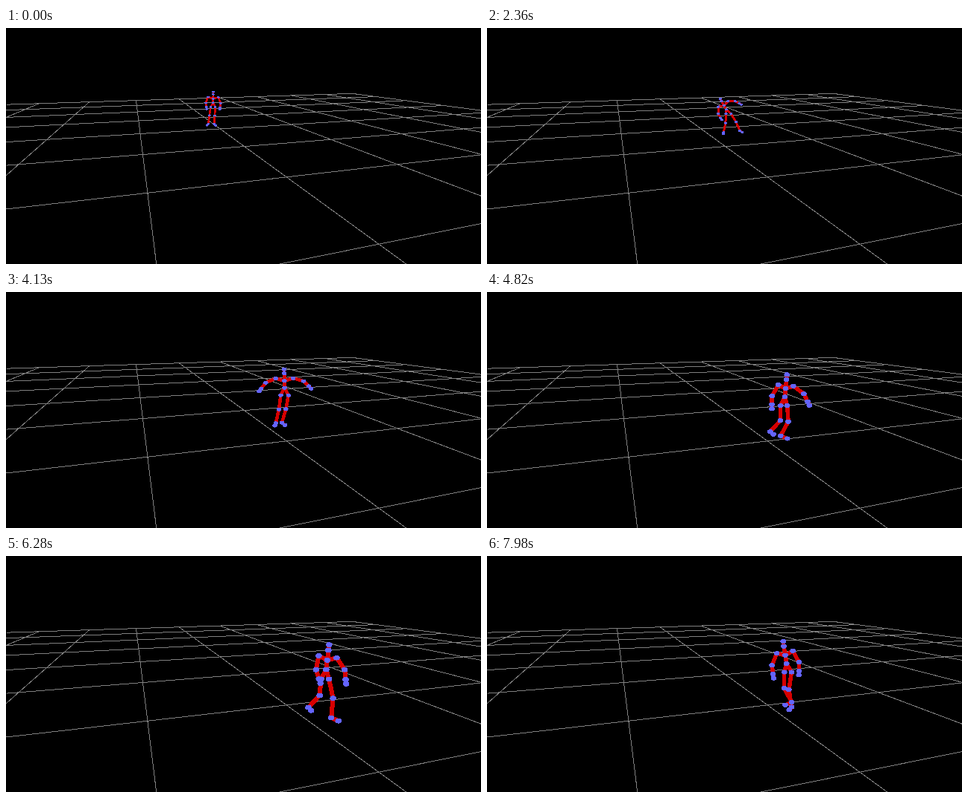
Recreate the animation shown at these times as an HTML page. Size 637x318 px, loop 8 s.

```html
<!DOCTYPE html>
<html lang="en">
<head>
<meta charset="utf-8">
<title>Walking figure</title>
<style>
  html, body { margin: 0; width: 100%; height: 100%; overflow: hidden; background: #000; }
  svg { display: block; width: 637px; height: 318px; }
  path { fill: none; }
</style>
</head>
<body>
<svg viewBox="0 0 637 318" shape-rendering="crispEdges">
  <path id="grid" stroke="#808080" transform="translate(.5 .5)"/>
  <path id="bones" stroke="#d60000" stroke-linejoin="round"/>
  <g id="dots" fill="#6464ff"></g>
</svg>
<script>
const LOOP = 8000, STEP = 76.85, LEAD = 24;
const { sin, cos, hypot, sqrt, max, min, PI } = Math;
const el = id => document.getElementById(id);
const rad = deg => deg * PI / 180;
const mix = (a, b, u) => a + (b - a) * u;
const between = (p, q, u) => [mix(p[0], q[0], u), mix(p[1], q[1], u)];
const line = points => 'M' + points.map(p => p.map(v => v.toFixed(2)).join(' ')).join('L');

// Floor grid: two families of lines, each meeting at its own vanishing point
function drawGrid() {
  const right = [1700, 48.3], back = [168, 48.8];
  const farEdge = x => 103 - 0.0323 * x;
  const edge = (farEdge(465) - back[1]) / (465 - back[0]);
  let d = '';
  for (let k = 0; k < 8; k++) {
    const y = right[1] + 1 / (0.002913 + 0.00221 * k);
    const slope = (y - right[1]) / right[0];
    const x = min(640, (y - back[1] + edge * back[0]) / (slope + edge));
    d += line([[0, y], [x, y - slope * x]]);
  }
  for (const x of [43, 111, 174, 232, 287, 336, 383, 428, 465]) {
    const from = [x, farEdge(x)];
    d += line([from, between(back, from, 7)]);
  }
  el('grid').setAttribute('d', d);
}

// Limb angles are degrees from straight down, positive to the right.
const names = ['at', 'hipX', 'hipY', 'headX', 'headY', 'turn', 'armL', 'armR', 'legL', 'legR'];
const key = (...values) => Object.fromEntries(names.map((name, i) => [name, values[i]]));
const keys = [
  key(0, 277.5, 106.5, 278, 86, 0, -6, 7, -8, -3),
  key(1520, 299.5, 118, 301, 96, 30, -21, 45, -19, 10),
  key(3130, 348, 115.5, 328, 95, 0, 36, 95, 5, 32),
  key(4130, 373.5, 139, 373, 104, 10, -52, 60, -10, -13),
  key(5590, 421.5, 164.5, 427, 118, 72, 31, 23, -32, -1),
  key(6900, 425.5, 163.5, 429, 119, 0, -27, 20, -8, 2),
  key(7980, 403.5, 156.5, 397, 115, -40, -7, 14, 14, 0)
];

// Smooth curve through the keys, with an alternating step of the legs in between
function poseAt(time) {
  let i = 0;
  while (i < keys.length - 2 && time >= keys[i + 1].at) i++;
  const a = keys[i], b = keys[i + 1];
  const before = keys[max(0, i - 1)], after = keys[min(keys.length - 1, i + 2)];
  const span = b.at - a.at, u = min(1, (time - a.at) / span), v = 1 - u;
  const pose = {};
  for (const name of names) {
    const speedA = (b[name] - a[name === name ? name : 0] + a[name] - before[name]) / (b.at - before.at);
    const speedB = (after[name] - a[name]) / (after.at - a.at);
    pose[name] = a[name] * v * v * (1 + 2 * u) + b[name] * u * u * (1 + 2 * v)
      + span * u * v * (v * speedA - u * speedB);
  }
  const swing = 10 * sin(2 * PI * u);
  pose.legL += swing;
  pose.legR -= swing;
  return pose;
}

const polar = ([x, y], angle, reach) => [x + reach * sin(angle), y + reach * cos(angle)];

// Middle joint of a limb: the closer its ends, the further it bulges sideways
function bend(a, b, length, bulge) {
  const dx = b[0] - a[0], dy = b[1] - a[1], d = hypot(dx, dy);
  const out = bulge * sqrt(max(0, length * length - d * d)) / 2 / d;
  return [(a[0] + b[0]) / 2 + dy * out, (a[1] + b[1]) / 2 - dx * out];
}

function drawFigure(time) {
  const pose = poseAt(time);
  const head = [pose.headX, pose.headY], hips = [pose.hipX, pose.hipY];
  const up = [head[0] - hips[0], head[1] - hips[1]], size = hypot(...up);
  const side = sin(rad(pose.turn)), front = cos(rad(pose.turn));
  const [belly, chest, shoulders, neck] = [0.28, 0.55, 0.65, 0.84].map(u => between(hips, head, u));

  const arm = (sign, deg) => {
    const wide = sign * 0.34 * front;
    const shoulder = [shoulders[0] - up[1] * wide, shoulders[1] + up[0] * wide];
    const hand = polar(shoulder, rad(deg), 0.8 * size);
    const elbow = bend(shoulder, hand, 0.95 * size, sign * 0.4);
    return [shoulder, elbow, between(elbow, hand, 0.68), hand];
  };
  // A trailing leg lifts its foot; knees bend the way the body is turned
  const leg = (sign, deg) => {
    const hip = [hips[0] + sign * 0.15 * size * front, hips[1]];
    const trail = max(0, -sin(rad(deg)) * side);
    const ankle = polar(hip, rad(deg), size * (1.12 - 0.85 * trail));
    const knee = bend(hip, ankle, 1.2 * size, 0.6 * side);
    const toe = [ankle[0] + size * (0.22 * side + sign * 0.08 * front), ankle[1] + 0.09 * size];
    return [hip, knee, ankle, toe];
  };
  const arms = [arm(-1, pose.armL), arm(1, pose.armR)];
  const legs = [leg(-1, pose.legL), leg(1, pose.legR)];

  const bones = [[head, neck, chest, belly], ...arms.map(a => [chest, ...a]), ...legs.map(l => [belly, ...l])];
  el('bones').setAttribute('d', bones.map(line).join(''));
  el('bones').setAttribute('stroke-width', (0.13 * size).toFixed(2));

  const rx = (0.092 * size).toFixed(2), ry = (0.073 * size).toFixed(2);
  el('dots').innerHTML = [head, neck, chest, belly, ...arms.flat(), ...legs.flat()].map(([x, y]) =>
    `<ellipse cx="${x.toFixed(2)}" cy="${y.toFixed(2)}" rx="${rx}" ry="${ry}"/>`).join('');
}

let shown = -1;
function tick() {
  const time = performance.now() % LOOP;
  const step = Math.floor((time + LEAD) / STEP);
  if (step !== shown) {
    shown = step;
    drawFigure(step ? step * STEP - LEAD + 8 : 0);
  }
  requestAnimationFrame(tick);
}

drawGrid();
tick();
</script>
</body>
</html>
```
